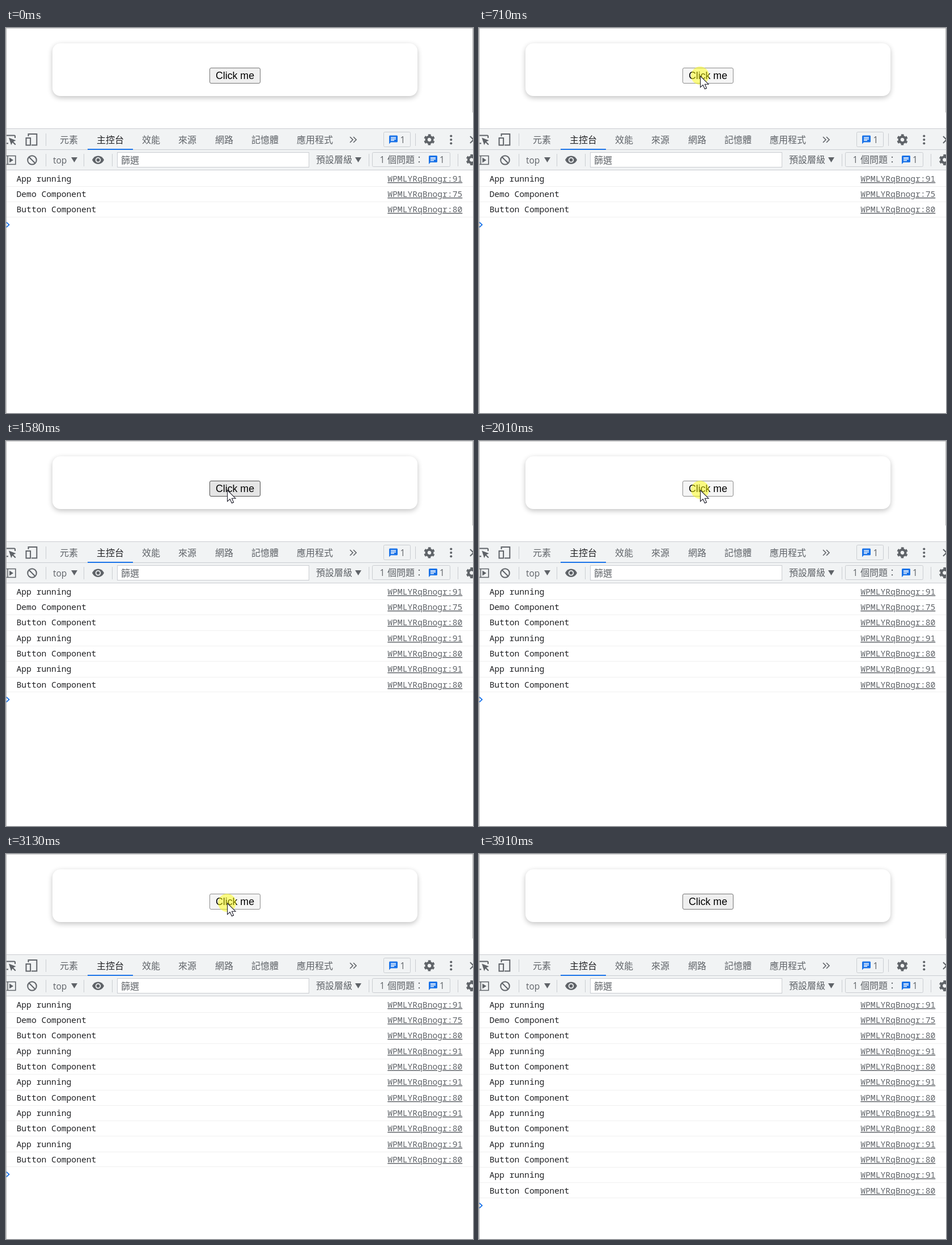
Recreate the animation shown at these times as an HTML page. Size 824x679 px, loop 4090 ms.

```html
<!DOCTYPE html>
<html lang="zh-Hant">
<head>
<meta charset="utf-8">
<title>Console demo</title>
<style>
  html, body { margin: 0; width: 100%; height: 100%; overflow: hidden; background: #fff; }
  .card {
    position: absolute; left: 82px; top: 27px; width: 644px; height: 93px;
    border-radius: 14px; background: #fff; box-shadow: 0 3px 10px rgba(0, 0, 0, .24);
  }
  svg { position: absolute; left: 0; top: 0; display: block; }
  text { white-space: pre; }
  .ui { font: 350 16px "Noto Sans CJK TC", "Noto Sans CJK", "Noto Sans CJK JP", sans-serif; fill: #5f6368; }
  .latin { font: 15.5px "Open Sans", "Noto Sans", sans-serif; fill: #5f6368; }
  .mono { font: 14.68px "Noto Sans Mono", "DejaVu Sans Mono", monospace; fill: #202124; }
  .link { fill: #5f6368; text-decoration: underline; }
  .label { font: 17.78px "Liberation Sans", Arial, sans-serif; text-anchor: middle; }
  .icon { fill: none; stroke: #5f6368; stroke-width: 2; }
  .thin { stroke-width: 1.6; }
  .solid { fill: #5f6368; }
  .edge { fill: none; stroke: #cacdd1; }
  .rule { fill: #f0f0f0; }
</style>
</head>
<body>
<div class="card"></div>
<svg width="824" height="679" viewBox="0 0 824 679">
  <defs>
    <g id="bubble">
      <path fill="#1a73e8" d="M1.5 0H13.5Q15 0 15 1.5V10.5Q15 12 13.5 12H3L0 15V1.5Q0 0 1.5 0Z"/>
      <path stroke="#fff" stroke-width="1.5" d="M3 3.7H12M3 6.2H12M3 8.7H9"/>
    </g>
    <g id="gear" transform="rotate(30)">
      <circle r="5.4" fill="none" stroke="#5f6368" stroke-width="4.2"/>
      <circle r="8.3" fill="none" stroke="#5f6368" stroke-width="2.8" stroke-dasharray="4.6 4.09" stroke-dashoffset="2.3"/>
    </g>
    <path id="down" class="solid" d="M0 0H11L5.5 9Z"/>
  </defs>

  <rect id="face" x="359.5" y="70.5" width="89" height="27" rx="2.5"/>
  <text class="label" x="404" y="90">Click me</text>

  <rect y="177" width="824" height="74" fill="#f1f3f4"/>
  <path class="edge" d="M0 177.5H824M0 214.5H824M0 250.5H824"/>
  <path fill="#1a73e8" d="M144 213H224V215H144Z"/>
  <path class="edge" d="M70.5 186V208M722.5 186V208M70.5 222V244M137.5 222V244M187.5 222V244M640.5 222V244M797.5 222V244"/>
  <g id="tabs"></g>

  <!-- upper toolbar icons -->
  <path class="icon" d="M0 189.5H14.5Q16 189.5 16 191V194M0 203.5H4"/>
  <path class="solid" d="M5 193.5L17.5 198.3L13 200.4L17.5 205L16 206.6L11.4 202L9.2 206.5Z"/>
  <path class="icon" d="M39.5 191V187H54.3V206.5H45"/>
  <rect class="icon" x="35.5" y="194" width="7.6" height="12.6"/>
  <path class="icon thin" d="M607 192L612 197L607 202M613 192L618 197L613 202"/>
  <rect class="edge" x="666.5" y="183.5" width="47" height="26" rx="2"/>
  <use href="#bubble" x="676" y="189.5"/>
  <text class="latin" x="695.5" y="203">1</text>
  <use href="#gear" x="747" y="197"/>
  <g class="solid"><circle cx="785.3" cy="190.5" r="2.1"/><circle cx="785.3" cy="197" r="2.1"/><circle cx="785.3" cy="203.5" r="2.1"/></g>
  <path class="icon" d="M819 191L831 203M831 191L819 203"/>

  <!-- lower toolbar -->
  <path class="icon thin" d="M0 225.5H16.8V240.5H0M3 225V241"/>
  <path class="solid" d="M6 228.5L13 233L6 237.5Z"/>
  <circle class="icon" cx="46" cy="233" r="7.8"/>
  <path class="icon" d="M40.5 227.5L51.5 238.5"/>
  <text class="latin" x="83" y="238.5">top</text>
  <use href="#down" x="115" y="228"/>
  <path class="solid" d="M152 232.8Q155.5 225.5 162.5 225.5T173 232.8Q169.5 240 162.5 240T152 232.8Z"/>
  <circle cx="162.5" cy="232.8" r="3.9" fill="#5f6368" stroke="#f1f3f4" stroke-width="1.8"/>
  <rect x="196.5" y="219.5" width="338" height="26" fill="#fff" stroke="#cacdd1"/>
  <text class="ui" x="203" y="239">篩選</text>
  <text class="ui" x="547" y="238">預設層級</text>
  <use href="#down" x="616" y="228"/>
  <rect class="edge" x="646.5" y="219.5" width="137" height="25" rx="2"/>
  <text class="latin" x="659.5" y="238">1</text>
  <text class="ui" x="673" y="238">個問題：</text>
  <use href="#bubble" x="746" y="225"/>
  <text class="latin" x="765" y="238">1</text>
  <use href="#gear" x="821.5" y="232.5"/>

  <g id="log"></g>
  <g id="prompt">
    <rect class="rule" width="824" height="1"/>
    <path fill="none" stroke="#1a73e8" stroke-width="1.7" d="M.5 9.5L5.5 14L.5 18.5"/>
  </g>

  <path fill="none" stroke="#b4b4b4" d="M.5 0V679"/>
  <path fill="none" stroke="#c8c8c8" d="M0 .5H824"/>
  <path fill="none" stroke="#b8b8b8" d="M823.5 0V149"/>

  <g id="pointer">
    <circle id="spot" r="16" fill="#ff0" fill-opacity=".47"/>
    <path fill="#fff" stroke="#1c1c28" stroke-width="1.1"
          d="M.6 .8V20.6L5.2 16.4L8.4 23.5L11.6 22.1L8.5 15.2H15Z"/>
  </g>
</svg>
<script>
const LOOP = 4090;
const NS = "http://www.w3.org/2000/svg";
const $ = id => document.getElementById(id);

// press and release times
const clicks = [[640, 770], [1390, 1520], [2010, 2140], [2570, 2700], [3130, 3260]];

// pointer steps: time, x, y
const moves = [
  [60, 617, 528], [120, 560, 430], [190, 490, 312], [250, 430, 222],
  [320, 390, 166], [380, 377, 146], [440, 380, 120], [510, 387, 96],
  [570, 390, 84], [1010, 390, 85], [1580, 390, 86],
  [3390, 420, 130], [3450, 500, 262], [3520, 600, 425], [3580, 682, 555],
  [3650, 730, 637], [3720, 732, 649], [3780, 733, 660], [3840, 733, 671],
  [3910, 733, 700]
];

const faces = {
  normal: ["#efefef", "#767676"],
  hover: ["#e5e5e5", "#4f4f4f"],
  active: ["#f5f5f5", "#8d8d8d"]
};

function add(parent, tag, attrs, content = "") {
  const el = document.createElementNS(NS, tag);
  for (const key in attrs) el.setAttribute(key, attrs[key]);
  el.textContent = content;
  return parent.appendChild(el);
}

const tabs = [[95, "元素"], [160, "主控台"], [240, "效能"], [304, "來源"], [369, "網路"], [433, "記憶體"], [513, "應用程式"]];
for (const [x, name] of tabs) {
  const tab = add($("tabs"), "text", { class: "ui", x, y: 203 }, name);
  if (name === "主控台") tab.style.fill = "#202124";
}

// top border of row i; the last row closes one pixel early
const rowTop = i => Math.round(251.7 + 27.3 * i);
const rows = [];
for (let i = 0; i < 13; i++) {
  const [message, line] = i === 1 ? ["Demo Component", 75]
    : i === 0 || (i > 2 && i % 2) ? ["App running", 91]
    : ["Button Component", 80];
  const y = Math.round(270.8 + 27.33 * i);
  const row = add($("log"), "g", {});
  if (i) add(row, "rect", { class: "rule", y: rowTop(i), width: 824, height: 1 });
  add(row, "text", { class: "mono", x: 18.5, y }, message);
  add(row, "text", { class: "mono link", x: 805.3, y, "text-anchor": "end" }, "WPMLYRqBnogr:" + line);
  rows.push(row);
}

function draw(t) {
  const step = moves.filter(m => m[0] <= t).pop();
  const [x, y] = step ? step.slice(1) : [-50, -50];
  const pressed = clicks.some(([down, up]) => t >= down && t < up);
  const over = x >= 359 && x < 449 && y >= 70 && y < 98;
  const count = 3 + 2 * clicks.filter(c => c[1] <= t).length;

  const [fill, stroke] = faces[pressed ? "active" : over ? "hover" : "normal"];
  $("face").setAttribute("fill", fill);
  $("face").setAttribute("stroke", stroke);

  rows.forEach((row, i) => row.setAttribute("visibility", i < count ? "visible" : "hidden"));
  $("prompt").setAttribute("transform", `translate(0 ${rowTop(count) - 1})`);

  $("pointer").setAttribute("transform", `translate(${x} ${y})`);
  $("spot").setAttribute("visibility", pressed ? "visible" : "hidden");
}

const start = performance.now();
function tick() {
  draw((performance.now() - start) % LOOP);
  requestAnimationFrame(tick);
}
tick();
</script>
</body>
</html>
```
